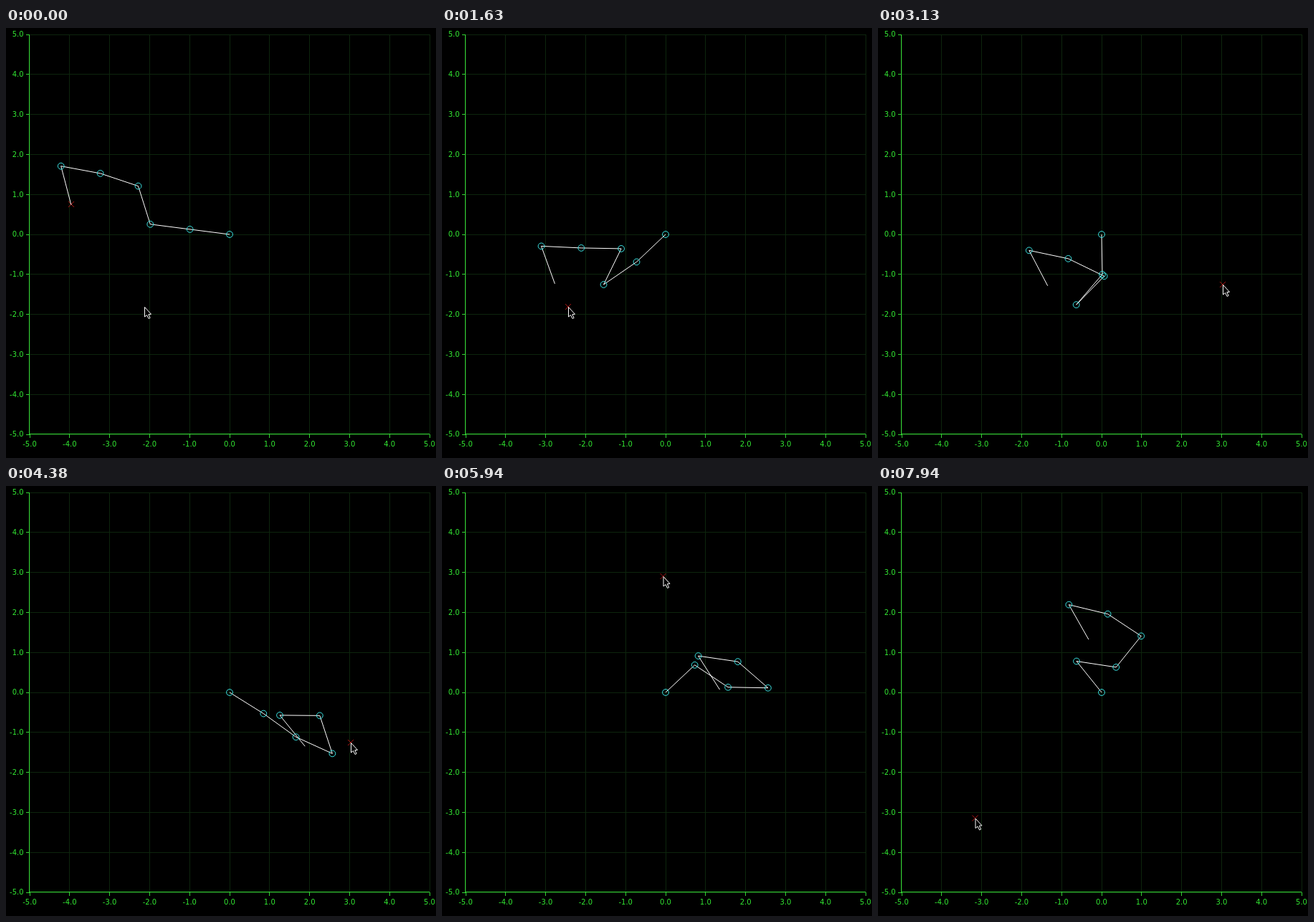
Animation, 600 px wide and 600 px high, one loop 8000 ms. Source, as an HTML page:

```html
<!DOCTYPE html>
<html>
<head>
<meta charset="utf-8">
<title>Six-link arm</title>
<style>
  html, body { margin: 0; width: 100%; height: 100%; overflow: hidden; background: #000; }
  svg { display: block; width: 100vw; height: 100vh; }
  text { font: 10px "DejaVu Sans", sans-serif; fill: #32e632; }
  .grid { stroke: #0d250d; }
  .axis { stroke: #32d232; }
  .grid, .axis { fill: none; shape-rendering: crispEdges; }
  #arm { fill: none; stroke: #fff; }
  #joints { fill: none; stroke: #3ce6e6; }
  #goal { fill: none; stroke: #a81414; }
  #cursor { fill: #000; stroke: #fff; }
</style>
</head>
<body>
<svg viewBox="0 0 600 600">
  <g id="plot"></g>
  <path id="goal" d="M-4-4 4 4M-4 4 4-4"/>
  <path id="arm"/>
  <g id="joints"></g>
  <path id="cursor" d="M0 0V13.5L3 11 5.6 16 7.6 15 5.3 10.2 9 9.8Z"/>
</svg>
<script>
const NS = 'http://www.w3.org/2000/svg';
const UNIT = 55.8, BASE = { x: 312, y: 288 };
const LOOP = 8000, STEP = 62.5, GAIN = 0.0012;
const $ = id => document.getElementById(id);

function add(parent, name, attrs, text = '') {
  const el = document.createElementNS(NS, name);
  for (const key in attrs) el.setAttribute(key, attrs[key]);
  el.textContent = text;
  parent.appendChild(el);
  return el;
}

function drawPlot() {
  const plot = $('plot');
  let grid = '', axis = 'M32.5 9V567M32 566.5H591';
  for (let v = -5; v <= 5; v++) {
    const x = BASE.x + v * UNIT, y = BASE.y - v * UNIT;
    const px = Math.floor(x + 0.01) + 0.5, py = Math.floor(y + 0.01) + 0.5;
    grid += `M${px} 9V567M33 ${py}H591`;
    axis += `M${px} 567V572M28 ${py}H33`;
    add(plot, 'text', { x, y: 583.6, 'text-anchor': 'middle' }, v.toFixed(1));
    add(plot, 'text', { x: 24.6, y: y + 3.4, 'text-anchor': 'end' }, v.toFixed(1));
  }
  add(plot, 'path', { class: 'grid', d: grid });
  add(plot, 'path', { class: 'axis', d: axis });
}

// Each click sets a goal; the pointer glides there on a curve for `lead` ms before it
const clicks = [
  { at: 190, lead: 190, via: [184, 389], goal: [176, 389] },
  { at: 2690, lead: 540, via: [420, 425], goal: [481, 358] },
  { at: 5450, lead: 400, via: [395, 242], goal: [308.5, 126] },
  { at: 7630, lead: 720, via: [504, 427], goal: [135.5, 463.5] }
];
const firstGoal = [91, 246], firstPointer = [193, 389];

// Joint angles in degrees, each relative to the link before
const poses = [
  { at: 0, q: [172.7, 0, -65.2, 54, 8, 115.2] },
  { at: 1630, q: [223.5, -9, -150.6, 115.1, -1.6, 112.4] },
  { at: 3130, q: [271, -41.6, -183.7, 108.4, 14, 129.6] },
  { at: 4380, q: [328, -3.8, -348.7, 132.8, 71.2, 129.6] },
  { at: 5940, q: [403.2, -76.9, -327.3, 140, 32.7, 130.8] },
  { at: 7130, q: [458.3, -90.1, -318.8, 80.5, 30.4, 142.5] },
  { at: 7940, q: [488.8, -137.4, -300.2, 95.4, 19.9, 133.1] }
];

// Proportional control: the arm closes in on its pose exponentially, and may run past b
function approach(a, b, t) {
  const p = (1 - Math.exp(-GAIN * (t - a.at))) / (1 - Math.exp(-GAIN * (b.at - a.at)));
  return a.q.map((v, i) => v + (b.q[i] - v) * p);
}

// The arm keeps its course until a click turns it
clicks.forEach(({ at }) => {
  const i = poses.findIndex(p => p.at > at);
  const q = i > 1 ? approach(poses[i - 2], poses[i - 1], at) : poses[0].q;
  poses.splice(i, 0, { at, q });
});

function poseAt(t) {
  const i = poses.findIndex(p => p.at > t);
  return i < 0 ? poses[poses.length - 1].q : approach(poses[i - 1], poses[i], t);
}

function pointerAt(t) {
  return clicks.reduce((from, { at, lead, via, goal }) => {
    const u = Math.min(1, Math.max(0, 1 - (at - t) / lead));
    const s = u * u * (3 - 2 * u), r = 1 - s;
    return from.map((v, i) => r * r * v + 2 * r * s * via[i] + s * s * goal[i]);
  }, firstPointer);
}

const goalAt = t => clicks.reduce((g, c) => c.at <= t ? c.goal : g, firstGoal);

// Start of the step on screen, on a 10 ms grid
function stepTime(t) {
  const start = n => Math.round(n * STEP / 10) * 10;
  let n = Math.floor(t / STEP) + 1;
  while (start(n) > t) n--;
  return n < 2 ? 0 : start(n);
}

function place(el, [x, y]) {
  el.setAttribute('transform', `translate(${x} ${y})`);
}

drawPlot();
const joints = Array.from({ length: 6 }, () => add($('joints'), 'circle', { r: 4.4 }));

function draw(time) {
  const t = stepTime(time);
  let { x, y } = BASE, angle = 0, d = `M${x} ${y}`;
  poseAt(t).forEach((q, i) => {
    place(joints[i], [x, y]);
    angle += q * Math.PI / 180;
    x += UNIT * Math.cos(angle);
    y -= UNIT * Math.sin(angle);
    d += `L${x.toFixed(2)} ${y.toFixed(2)}`;
  });
  $('arm').setAttribute('d', d);
  place($('goal'), goalAt(t));
  place($('cursor'), pointerAt(t).map(v => v + 0.5));
}

const began = performance.now();
function frame() {
  draw((performance.now() - began) % LOOP);
  requestAnimationFrame(frame);
}
frame();
</script>
</body>
</html>
```
